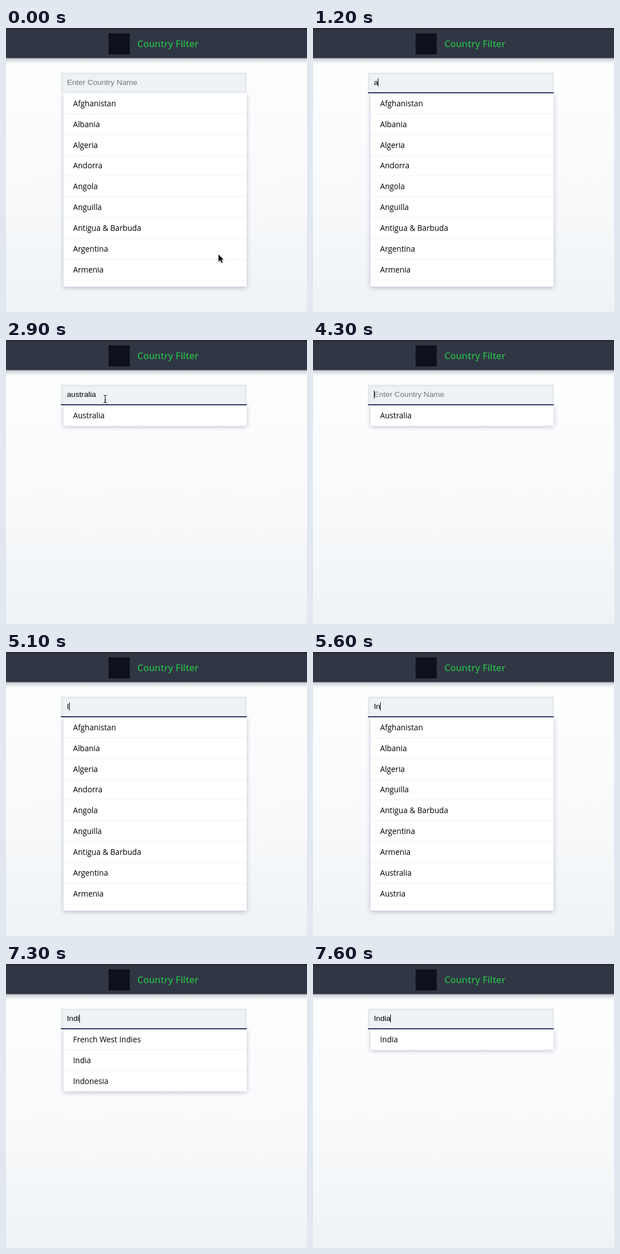
Write an HTML page with a canvas that moves like this. It is 534 px wide and 504 px high and loops after 8000 ms.

```html
<!DOCTYPE html>
<html lang="en">
<head>
<meta charset="utf-8">
<title>Country Filter</title>
<style>
html, body { margin: 0; width: 100%; height: 100%; overflow: hidden; }
canvas { display: block; }
</style>
</head>
<body>
<canvas id="stage" width="534" height="504"></canvas>
<script>
const ctx = document.getElementById('stage').getContext('2d');
const LOOP = 8000, ROW = 36.87, LIST_TOP = 115.5, LIST_MAX = 343.5;
const INPUT_FONT = '13.7px "Liberation Sans", Arial, sans-serif';
const LIST_FONT = '13.7px "Open Sans", sans-serif';
const TITLE_FONT = '600 16.4px "Open Sans", sans-serif';

const countries = ('Afghanistan,Albania,Algeria,Andorra,Angola,Anguilla,Antigua & Barbuda,Argentina,' +
  'Armenia,Aruba,Australia,Austria,Azerbaijan,Bahamas,Bahrain,Bangladesh,Barbados,Belarus,Belgium,' +
  'Belize,Benin,Bosnia & Herzegovina,Burkina Faso,China,Dominica,Dominican Republic,Finland,' +
  'French West Indies,Guinea Bissau,India,Indonesia,Macau,Mauritania,Mauritius,Nauru,Palau,' +
  'Saudi Arabia').split(',');

// [start ms, typed text, applied filter]; the filter follows on key release
const typing = [
  [0, '', ''], [1200, 'a', 'a'], [1400, 'au', 'a'], [1500, 'au', 'au'], [1600, 'aus', 'aus'],
  [1800, 'aust', 'aust'], [1900, 'austr', 'austr'], [2100, 'austra', 'austr'],
  [2200, 'austral', 'austra'], [2300, 'australi', 'austra'], [2400, 'australia', 'australia'],
  [3800, 'austral', 'australia'], [3900, 'austra', 'australia'], [4000, 'aust', 'australia'],
  [4100, 'aus', 'australia'], [4200, 'a', 'australia'], [4300, '', 'australia'], [4500, '', ''],
  [5100, 'I', ''], [5200, 'I', 'i'], [5600, 'In', 'i'], [5800, 'Ind', 'in'], [5900, 'Ind', 'ind'],
  [7300, 'Indi', 'ind'], [7400, 'Indi', 'indi'], [7500, 'India', 'indi'], [7600, 'India', 'india']
];
// [start ms, cursor shape, x, y]
const pointer = [
  [0, drawArrow, 377, 402], [100, drawArrow, 273, 266], [200, drawArrow, 250, 226],
  [400, drawArrow, 240, 160], [500, drawBeam, 226, 104], [1200, null],
  [2800, drawBeam, 172, 101], [2900, drawBeam, 176, 104.5], [3800, null]
];
const FOCUS = 700;
const caretToggles = [FOCUS, 2800, 3500, 4800, 5100, 6300, 6800];

const stepAt = (steps, t) => steps.filter(s => s[0] <= t).pop();

function rect(color, x, y, w, h) {
  ctx.fillStyle = color;
  ctx.fillRect(x, y, w, h);
}

function text(str, font, color, x, y) {
  ctx.font = font;
  ctx.fillStyle = color;
  ctx.fillText(str, x, y);
}

function withShadow(color, blur, dy, draw) {
  ctx.save();
  ctx.shadowColor = color;
  ctx.shadowBlur = blur;
  ctx.shadowOffsetY = dy;
  draw();
  ctx.restore();
}

function drawPage() {
  const sky = ctx.createLinearGradient(0, 54, 0, 504);
  sky.addColorStop(0, '#fdfefe');
  sky.addColorStop(0.5, '#f9fafc');
  sky.addColorStop(1, '#eff3f5');
  rect(sky, 0, 0, 534, 504);
  withShadow('rgba(40,50,70,.4)', 9, 2, () => rect('#313644', -10, 0, 554, 53.5));
  rect('#28282f', 0, 0, 534, 2.5);
  rect('#0e101c', 182, 9.5, 37.5, 37.5);
  text('Country Filter', TITLE_FONT, '#27b34b', 233, 34.3);
}

function drawInput(value, focused, caret) {
  rect('#e1e4e8', 97.5, 79.5, 329.5, 35);
  rect('#e9ecef', 99, 81, 326.5, 32);
  rect('#eff2f5', 100.5, 83, 323.5, 30);
  if (focused) rect('#313662', 97.5, 114, 329.5, 2);
  if (value) text(value, INPUT_FONT, '#000', 108, 101.3);
  else text('Enter Country Name', INPUT_FONT, '#757575', 108, 101.3);
  ctx.font = INPUT_FONT;
  if (caret) rect('#000', Math.round(107.8 + ctx.measureText(value).width), 89.5, 1, 14.5);
}

function drawList(filter) {
  const found = countries.filter(c => c.toLowerCase().includes(filter)).slice(0, 10);
  const height = Math.min(found.length * ROW, LIST_MAX);
  withShadow('rgba(50,50,110,.3)', 8, 2, () => rect('#fff', 102, LIST_TOP, 325, height));
  ctx.save();
  ctx.beginPath();
  ctx.rect(102, LIST_TOP, 325, height);
  ctx.clip();
  found.forEach((name, i) => {
    const y = LIST_TOP + i * ROW;
    text(name, LIST_FONT, '#000', 119, y + 23.3);
    rect('#eff1f3', 102, Math.round(y + ROW - 0.5), 325, 1);
  });
  ctx.restore();
}

function drawArrow() {
  const shape = new Path2D('M0 0V12.5L3 9.8L5.2 14.5L7.2 13.6L5.1 9H9Z');
  ctx.lineWidth = 1.6;
  ctx.strokeStyle = '#fff';
  withShadow('rgba(0,0,0,.35)', 2, 1, () => ctx.stroke(shape));
  ctx.fillStyle = '#000';
  ctx.fill(shape);
}

function drawBeam() {
  const shape = new Path2D('M-3 -6.5Q0 -6.5 0 -4.5Q0 -6.5 3 -6.5M0 -4.5V4.5M-3 6.5Q0 6.5 0 4.5Q0 6.5 3 6.5M-1.5 2H1.5');
  ctx.lineWidth = 2.6;
  ctx.strokeStyle = 'rgba(255,255,255,.8)';
  ctx.stroke(shape);
  ctx.lineWidth = 1.1;
  ctx.strokeStyle = '#111';
  ctx.stroke(shape);
}

function render(now) {
  const t = now % LOOP;
  const [, value, filter] = stepAt(typing, t);
  const [, cursor, x, y] = stepAt(pointer, t);
  const caret = caretToggles.filter(at => at <= t).length % 2 === 1;
  drawPage();
  drawList(filter);
  drawInput(value, t >= FOCUS, caret);
  if (cursor) {
    ctx.save();
    ctx.translate(x, y);
    cursor();
    ctx.restore();
  }
  requestAnimationFrame(render);
}
requestAnimationFrame(render);
</script>
</body>
</html>
```
